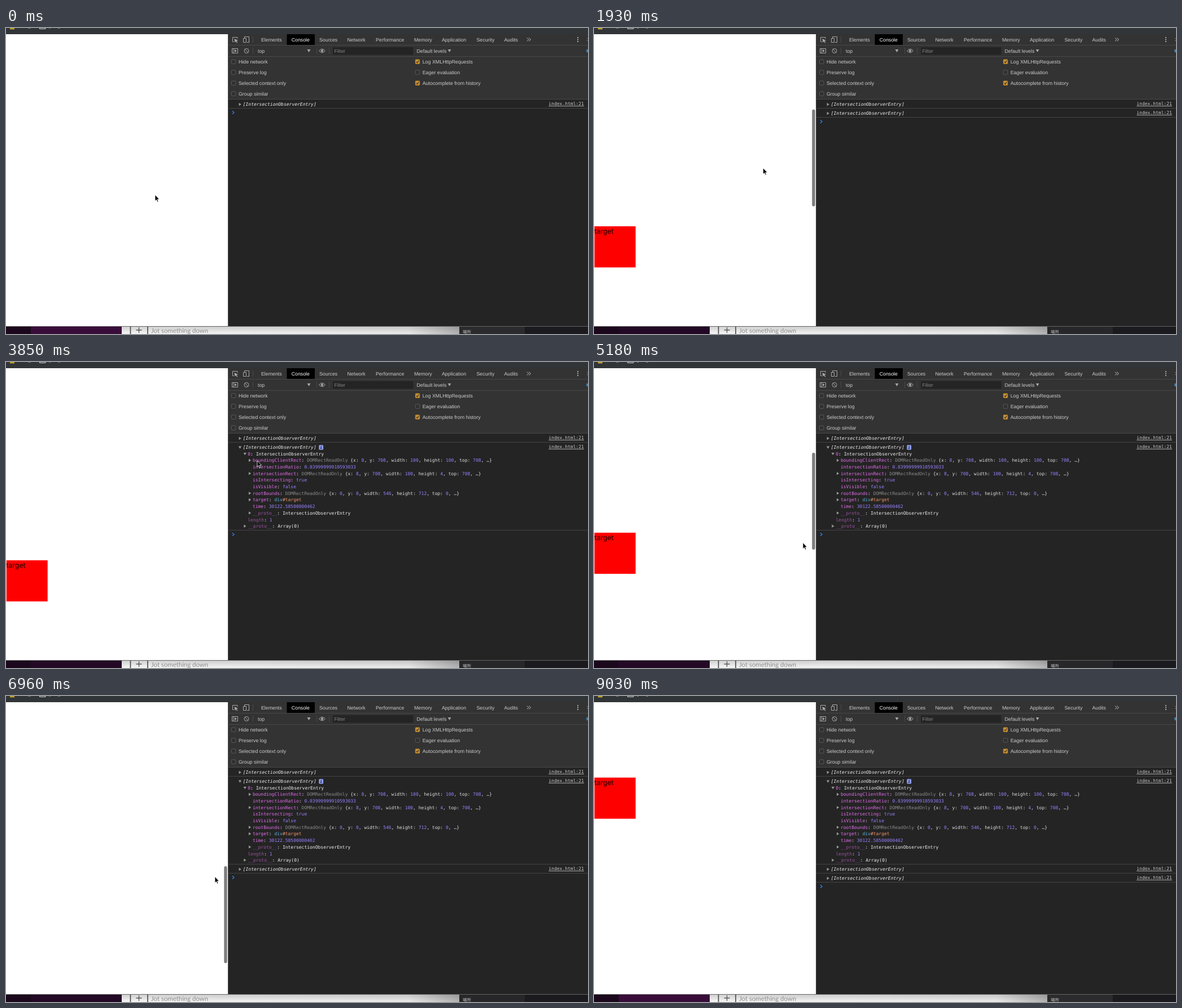
Animation, 1031 px wide and 543 px high, one loop 9.13 s. Source, as an HTML page:

```html
<!DOCTYPE html>
<html lang="en">
<head>
<meta charset="utf-8">
<title>Observer console</title>
<style>
html, body { margin: 0; width: 100%; height: 100%; overflow: hidden; background: #242424; }
svg { display: block; width: 1031px; height: 543px; }
text { white-space: pre; text-rendering: geometricPrecision; }
.ui { font: 8.8px "Liberation Sans", Arial, sans-serif; fill: #cccccc; }
.mono { font: 8px "DejaVu Sans Mono", monospace; fill: #f0f0f0; }
.it { font-style: italic; }
.line { stroke: #434343; }
.icon { fill: none; stroke: #a8a8a8; }
</style>
</head>
<body>
<svg viewBox="0 0 1031 543">
  <defs>
    <clipPath id="view"><rect y="11" width="393" height="519"/></clipPath>
    <linearGradient id="paper">
      <stop offset="0" stop-color="#f8f8f8"/><stop offset=".85" stop-color="#ececec"/><stop offset="1" stop-color="#b4b4b4"/>
    </linearGradient>
    <linearGradient id="shade" x2="0" y2="1">
      <stop offset="0" stop-opacity=".16"/><stop offset="1" stop-opacity="0"/>
    </linearGradient>
  </defs>

  <!-- strip below the window -->
  <rect y="530" width="45" height="13" fill="#1b081c"/>
  <rect id="side" x="44" y="530" width="161" height="13"/>
  <rect x="205" y="530" width="598" height="13" fill="url(#paper)"/>
  <rect x="205" y="530" width="598" height="13" fill="url(#shade)"/>
  <path d="M220.5 530V543M251 530V543" stroke="#444" stroke-width="1.6"/>
  <path d="M230.5 536H240.5M235.5 531V541" stroke="#555" stroke-width="1.3"/>
  <text x="257" y="541" font-family="Lato, sans-serif" font-size="11.4" fill="#8e8e8e">Jot something down</text>
  <rect id="places" x="803" y="530" width="116" height="13"/>
  <rect x="919" y="530" width="112" height="13" fill="#1b1a1e"/>
  <text x="809" y="541.5" font-family="'Noto Sans CJK JP', 'Noto Sans CJK', sans-serif" font-size="7.5" fill="#c4c4c4">場所</text>

  <!-- browser bar -->
  <rect width="1031" height="11" fill="#313538"/>
  <rect x="7" width="8" height="2.5" fill="#c2a02c"/>
  <path d="M39 .5H44M76 .5H79M92 .5H96" stroke="#777"/>
  <path d="M59.5 0V1.5H70V0" fill="none" stroke="#ddd"/>

  <!-- page -->
  <rect y="11" width="393" height="519" fill="#fff"/>
  <g clip-path="url(#view)">
    <g id="target">
      <rect x=".8" width="72.9" height="73" fill="#f00"/>
      <text x=".5" y="12.9" font-family="Inter, sans-serif" font-size="12.3" fill="#1a0000">target</text>
    </g>
    <rect id="thumb" x="386.3" width="5.4" height="172" rx="2.7" fill="#7d7d7d"/>
  </g>

  <!-- developer tools -->
  <rect x="393" y="11" width="638" height="519" fill="#242424"/>
  <rect x="394" y="11" width="637" height="115" fill="#333"/>
  <path d="M393.5 11V530" stroke="#4a4a4a"/>
  <path d="M394 30.5H1031M394 50.5H1031M394 126.5H1031M437.5 15V26M437.5 35V46M550.5 35V46M572.5 35V46" stroke="#484848"/>
  <path d="M0 529.5H1031" stroke="#666"/>
  <rect x="497.5" y="11" width="49.5" height="19" fill="#000"/>
  <g class="icon">
    <path d="M404 24.5H401.5V16.5H410V19"/><path d="M404.5 19L411 22 408.5 23 410.5 26 409 26.5 407.5 24 405.5 25.5Z" fill="#a8a8a8" stroke="none"/>
    <path d="M422.5 18V15.5H430.5V25.5H427M420.5 18.5H425.5V25.5H420.5Z"/>
    <path d="M400.5 36.5H410.5V44.5H400.5ZM403 36V45"/><path d="M405 38V43L409 40.5Z" fill="#a8a8a8" stroke="none"/>
    <circle cx="426" cy="40.5" r="4"/><path d="M423.2 37.7L428.8 43.3"/>
    <path d="M554.5 40.5Q560 34 565.5 40.5Q560 47 554.5 40.5Z"/><circle cx="560" cy="40.5" r="1.7" fill="#a8a8a8"/>
    <path d="M923 17.5L926 20.5 923 23.5M926.5 17.5L929.5 20.5 926.5 23.5" stroke="#c6c6c6"/>
    <path d="M1013 16V18M1013 19.5V21.5M1013 23V25" stroke-width="2"/>
    <path d="M1029.5 18L1031 19.5M1029.5 23L1031 21.5"/>
  </g>
  <circle cx="1031" cy="40.5" r="3" fill="#2b88c8"/>
  <path d="M533.5 38H539.5L536.5 43ZM782.8 38H788.4L785.6 43Z" fill="#a8a8a8"/>
  <rect x="579" y="34" width="142.5" height="13.5" fill="#242424"/>
  <g id="head"></g>
  <g id="log"></g>
  <g id="prompt">
    <path d="M401 -2.7L404 0 401 2.7" fill="none" stroke="#367cf1" stroke-width="1.3"/>
    <path id="caret" d="M411.5 -5V5" stroke="#e6e6e6"/>
  </g>
  <path id="mouse" d="M0 0V11L2.5 8.8 4.2 12.7 5.9 12 4.3 8.1H7.6Z" stroke="#fff" stroke-width=".8"/>
</svg>
<script>
const $ = id => document.getElementById(id);
const STEP = 147.7, LOOP = 9130;

// ---- static labels ----
const label = (x, y, s, size = 8.8, fill = '#cccccc') =>
  `<text class="ui" x="${x}" y="${y + 3.2}" style="font-size:${size}px;fill:${fill}">${s}</text>`;
const tabs = { Elements: 452, Console: 505.7, Sources: 555, Network: 604.5, Performance: 655,
  Memory: 723, Application: 772, Security: 833.5, Audits: 882.5 };
const check = (x, y, s, on) =>
  `<rect x="${x}" y="${y - 3.7}" width="7.4" height="7.4" rx="1" fill="${on ? '#cc9130' : '#303030'}" stroke="${on ? '#cc9130' : '#626262'}" stroke-width=".8"/>` +
  (on ? `<path d="M${x + 1.5} ${y}l1.8 2 2.8-4.2" fill="none" stroke="#333" stroke-width="1.2"/>` : '') +
  label(x + 12.4, y, s, 8.87);
$('head').innerHTML =
  Object.entries(tabs).map(([s, x]) => label(x, 20.5, s, 8.8, s == 'Console' ? '#fff' : undefined)).join('') +
  label(446, 40.3, 'top') + label(581.5, 41, 'Filter', 8.8, '#858585') + label(727.5, 40.3, 'Default levels') +
  ['Hide network', 'Preserve log', 'Selected context only', 'Group similar'].map((s, i) => check(399.5, 59.7 + 19 * i, s)).join('') +
  ['Log XMLHttpRequests', 'Eager evaluation', 'Autocomplete from history'].map((s, i) => check(725.3, 59.7 + 19 * i, s, i != 1)).join('');

// ---- console rows; "~c" switches the colour inside a row ----
const ink = { m: '#e36eec', d: '#9b529f', n: '#9980ff', g: '#8b8b8b', w: '#f0f0f0', s: '#dedede', b: '#5db0d7', o: '#f29766' };
const mono = (x, y, s, cls = '') => `<text class="mono ${cls}" x="${x}" y="${y + 2.9}">` +
  s.split('~').map((p, i) => i ? `<tspan fill="${ink[p[0]]}">${p.slice(1)}</tspan>` : p).join('') + '</text>';
const arrow = (x, y, open) =>
  `<path d="M${x} ${y}${open ? 'm-2.6-1.9h5.2l-2.6 4.4z' : 'm-1.9-2.7v5.4l4.2-2.7z'}" fill="#9a9a9a"/>`;
const rule = y => `<path class="line" d="M394 ${y}H1031"/>`;
const link = y => `<text class="mono" x="961.3" y="${y + 1.8}" style="fill:#c8c8c8" text-decoration="underline">index.html:21</text>`;
const title = (y, open) => arrow(414.5, y, open) + mono(419.7, y, '[IntersectionObserverEntry]', 'it');
const entry = y => title(y) + link(y) + rule(y + 7);
const badge = y => `<rect x="554.3" y="${y - 4.2}" width="7.8" height="8.4" rx="1.5" fill="#8d9df0"/>` +
  `<text class="mono it" x="556" y="${y + 2.6}" style="font-size:7px;fill:#223;font-weight:bold">i</text>`;
const nums = s => '~s' + s.replace(/\d[\d.]*/g, '~n$&~s');
const rect = (name, body) => `>~m${name}~w: ~gDOMRectReadOnly ${nums(`{${body}, …}`)}`;
const tail = ['1 ~dlength~w: ~n1', '1>~d__proto__~w: Array(0)'];
const brief = ['1>~m0~w: ~gIntersectionObserverEntry ~s{time: ~n30122.58500000462~s, rootBounds: ~wDOMRectReadOnly~s, boundingClientRect: ~wDOMRectReadOnly~s, in…', ...tail];
const full = ['1v~m0~w: IntersectionObserverEntry',
  '2' + rect('boundingClientRect', 'x: 8, y: 708, width: 100, height: 100, top: 708'),
  '2 ~mintersectionRatio~w: ~n0.03999999910593033',
  '2' + rect('intersectionRect', 'x: 8, y: 708, width: 100, height: 4, top: 708'),
  '2 ~misIntersecting~w: ~ntrue',
  '2 ~misVisible~w: ~nfalse',
  '2' + rect('rootBounds', 'x: 0, y: 0, width: 546, height: 712, top: 0'),
  '2>~mtarget~w: ~bdiv~o#target',
  '2 ~mtime~w: ~n30122.58500000462',
  '2>~d__proto__~w: IntersectionObserverEntry', ...tail];
// first character: depth, second: arrow state
const tree = (rows, y) => title(y, true) + badge(y) + rows.map((r, i) => {
  const x = 419.6 + 8.65 * r[0], ry = y + 11.3 + 11.68 * i;
  return (r[1] == ' ' ? '' : arrow(x - 5, ry, r[1] == 'v')) + mono(x, ry, r.slice(2));
}).join('') + rule(Math.round(y + 6.5 + 11.68 * rows.length) + .5);

// [first step, prompt y, markup after the first entry]
const details = link(151.5) + tree(full, 151.5);
const stages = [
  [0, 150, ''],
  [9, 166, entry(151.5)],
  [19, 211, link(151.5) + tree(brief, 161)],
  [21, 201.5, link(151.5) + tree(brief, 151.5)],
  [24, 306, details],
  [38, 322, details + entry(307.5)],
  [49, 338, details + entry(307.5) + entry(323.5)]];

// ---- motion ----
const thumbPath = [[4, 11], [5, 20], [7, 84], [8, 84], [9, 98], [10, 129], [11, 144.5], [34, 144.5], [35, 161],
  [37, 250], [38, 300], [39, 340], [40, 357], [43, 357], [44, 351], [46, 321], [47, 302], [49, 268],
  [51, 244], [52, 226], [53, 215], [54, 214.3]];
const mousePath = [[0, 264, 296], [2, 266, 293.5], [12, 266, 293.5], [16, 400, 113], [18, 414.5, 149], [20, 414.5, 149],
  [23, 423, 160], [26, 445, 175], [27, 445, 175], [31, 385, 300], [33, 370, 320.5], [51, 370, 320.5],
  [53, 364.5, 324], [54, 380, 335], [57, 850, 500], [58, 1011, 530]];
const at = (path, k, c = 1) => {
  const i = path.findIndex(p => p[0] > k);
  if (i < 0) return path.at(-1)[c];
  if (!i) return path[0][c];
  const a = path[i - 1], b = path[i];
  return a[c] + (b[c] - a[c]) * (k - a[0]) / (b[0] - a[0]);
};
const within = (k, ...spans) => spans.some(([a, b]) => k >= a && k < b);
const show = (el, on) => el.style.display = on ? '' : 'none';

let shown = -1;
function draw(k) {
  const thumb = at(thumbPath, k);
  $('target').setAttribute('transform', `translate(0 ${489.8 - 2.967 * (thumb - 98)})`);
  $('thumb').setAttribute('y', thumb);
  show($('thumb'), within(k, [5, 16], [35, 57]));
  $('mouse').setAttribute('transform', `translate(${at(mousePath, k)} ${at(mousePath, k, 2)})`);
  show($('mouse'), k < 59);

  const [, y, rows] = stages.findLast(s => s[0] <= k);
  $('log').innerHTML = entry(135.5) + rows;
  $('prompt').setAttribute('transform', `translate(0 ${y})`);
  show($('caret'), within(k, [2, 6], [9, 13], [16, 18]));

  const active = k < 1 || k >= 61;
  $('side').setAttribute('fill', active ? '#390d3a' : '#230925');
  $('places').setAttribute('fill', active ? '#2b2b2d' : '#272729');
}
function tick() {
  const k = Math.floor(performance.now() % LOOP / STEP);
  if (k != shown) draw(shown = k);
  requestAnimationFrame(tick);
}
tick();
</script>
</body>
</html>
```
